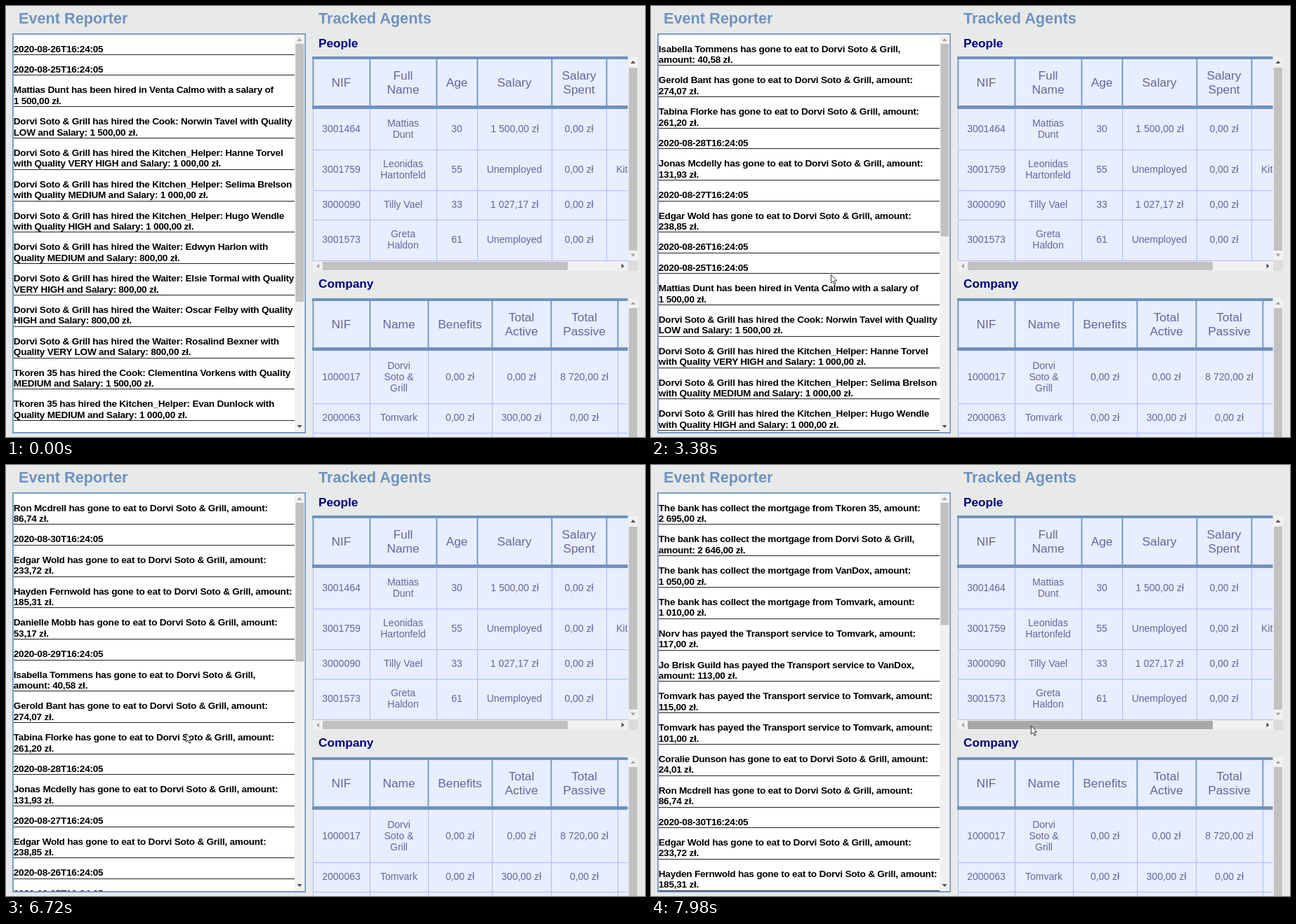
Write an HTML page that moves like this. It is 910x615 px and loops after 8000 ms.

```html
<!DOCTYPE html>
<html lang="en">
<head>
<meta charset="utf-8">
<title>Event Reporter</title>
<style>
  html, body { margin: 0; width: 100%; height: 100%; overflow: hidden; background: #e7eae9; }
  svg { display: block; font-family: "Liberation Sans", Arial, sans-serif; }
  .title { font-size: 21.7px; font-weight: bold; fill: #7092be; }
  .sub { font-size: 17.2px; font-weight: bold; fill: #000080; }
  .log { font-size: 13.6px; font-weight: bold; letter-spacing: -0.245px; fill: #000; }
  .head { font-size: 17.3px; fill: #666699; }
  .cell { font-size: 14px; fill: #666699; }
  .mid { text-anchor: middle; }
</style>
</head>
<body>
<svg id="stage" width="910" height="615" viewBox="0 0 910 615">
  <defs>
    <clipPath id="logClip"><rect x="10" y="41" width="401" height="567"/></clipPath>
    <clipPath id="tableClip"><rect x="436" y="70" width="449.5" height="545"/></clipPath>
  </defs>
  <rect width="910" height="615" fill="#e7eae9"/>
</svg>
<script>
const LOOP = 8000;
const BLUE = '#7092be', CELL = '#e8edff', LINE = '#aabcfe';
const TRACK = '#f1f1f1', THUMB = '#c1c1c1', HOVER = '#a8a8a8';
const DARK = '#505050', PALE = '#a3a3a3';
const stage = document.getElementById('stage');

function add(parent, tag, attrs, text) {
  const el = document.createElementNS('http://www.w3.org/2000/svg', tag);
  for (const k in attrs) el.setAttribute(k, attrs[k]);
  if (text) el.textContent = text;
  parent.appendChild(el);
  return el;
}
const box = (p, x, y, width, height, fill) => add(p, 'rect', { x, y, width, height, fill });
const label = (p, x, y, cls, text) => add(p, 'text', { x, y, class: cls }, text);

// Small triangle centred on x, y; turn is in degrees, 0 points up
function arrow(x, y, turn, fill) {
  add(stage, 'path', { d: 'M-3.5 2 L0 -2 L3.5 2Z', fill, transform: `translate(${x} ${y}) rotate(${turn})` });
}

// Centred lines around the baseline of a single line
function lines(p, x, y, pitch, cls, text) {
  const parts = text.split('|');
  parts.forEach((s, i) => label(p, x, y + (i - (parts.length - 1) / 2) * pitch, cls + ' mid', s));
}

function table(top, edges, heads, rows, heights) {
  const g = add(stage, 'g', { 'clip-path': 'url(#tableClip)' });
  const body = top + 75;
  const mid = i => (edges[i] + edges[i + 1]) / 2;
  const total = heights.reduce((a, b) => a + b, 0);
  box(g, 437, top, 449, 75 + total, CELL);
  for (const x of edges) {
    box(g, x - 0.5, top, 1.8, 75, BLUE);
    box(g, x, body, 1, total, LINE);
  }
  box(g, 436, top, 450, 4, BLUE);
  box(g, 436, top + 70, 450, 5, BLUE);
  heads.forEach((h, i) => lines(g, mid(i), top + 43, 20, 'head', h));
  let y = body;
  heights.forEach((h, r) => {
    const base = y + h / 2 + 4.3;
    (rows[r] || []).forEach((s, i) => lines(g, mid(i), base, 16, 'cell', s));
    y += h;
    box(g, 437, y, 449, 1, LINE);
  });
  return g;
}

// Headings
label(stage, 18, 24.5, 'title', 'Event Reporter');
label(stage, 445, 24.5, 'title', 'Tracked Agents');
label(stage, 445, 59, 'sub', 'People');
label(stage, 445, 402, 'sub', 'Company');

// People
const people = table(72, [437, 518, 613, 671, 777, 855],
  ['NIF', 'Full|Name', 'Age', 'Salary', 'Salary|Spent'],
  [
    ['3001464', 'Mattias|Dunt', '30', '', '0,00 zł'],
    ['3001759', 'Leonidas|Hartonfeld', '55', 'Unemployed', '0,00 zł'],
    ['3000090', 'Tilly Vael', '33', '1 027,17 zł', '0,00 zł'],
    ['3001573', 'Greta|Haldon', '61', 'Unemployed', '0,00 zł']
  ], [58, 58, 42, 58]);
label(people, 869, 238.3, 'cell', 'Kitchen_Helper');
const salary = label(people, 724.5, 180.3, 'cell mid', '');

box(stage, 886, 73, 14, 290, TRACK);
box(stage, 887, 88, 12, 261, THUMB);
arrow(893, 80, 0, DARK);
arrow(893, 355.5, 180, PALE);
box(stage, 437, 364, 449, 14, TRACK);
box(stage, 886, 363, 14, 15, '#dcdcdc');
const sideThumb = box(stage, 451, 365, 349, 12, THUMB);
arrow(444, 371, -90, PALE);
arrow(878.5, 371, 90, DARK);

// Company
table(417, [437, 518, 601, 692, 776, 871],
  ['NIF', 'Name', 'Benefits', 'Total|Active', 'Total|Passive'],
  [
    ['1000017', 'Dorvi|Soto &|Grill', '0,00 zł', '0,00 zł', '8 720,00 zł'],
    ['2000063', 'Tomvark', '0,00 zł', '300,00 zł', '0,00 zł']
  ], [75, 42, 42]);
box(stage, 886, 417, 14, 198, TRACK);
box(stage, 887, 431, 12, 184, THUMB);
arrow(893, 424, 0, PALE);

// Event log frame
box(stage, 9, 39, 418, 570.8, BLUE);
box(stage, 10.8, 40.8, 414.4, 567.2, '#fff');
box(stage, 411.3, 40.8, 13.9, 567.2, TRACK);
arrow(418, 48, 0, PALE);
arrow(418, 600, 180, DARK);
const logThumb = box(stage, 412.4, 54, 11.8, 0, THUMB);
const log = add(stage, 'g', { 'clip-path': 'url(#logClip)' });

// Event texts; a bar marks the line break
const GRILL = 'Dorvi Soto & Grill';
const day = n => `2020-08-${n}T16:24:05`;
const ate = (who, sum) => `${who} has gone to eat to ${GRILL}, amount:|${sum} zł.`;
const moved = (who, to, sum, gap = ' amount:|') => `${who} has payed the Transport service to ${to},${gap}${sum} zł.`;
const loan = (who, sum, gap = ' amount:|') => `The bank has collect the mortgage from ${who},${gap}${sum} zł.`;
const hired = (job, who, rest, by = GRILL) => `${by} has hired the ${job}: ${who} ${rest} zł.`;
const BEFORE = '|amount: ';

// [time of arrival, text], oldest first
const events = [
  [0, hired('Kitchen_Helper', 'Leopold Farrant', 'with|Quality LOW and Salary: 1 000,00', 'Tkoren 35')],
  [0, hired('Kitchen_Helper', 'Evan Dunlock', 'with|Quality MEDIUM and Salary: 1 000,00', 'Tkoren 35')],
  [0, hired('Cook', 'Clementina Vorkens', 'with Quality|MEDIUM and Salary: 1 500,00', 'Tkoren 35')],
  [0, hired('Waiter', 'Rosalind Bexner', 'with|Quality VERY LOW and Salary: 800,00')],
  [0, hired('Waiter', 'Oscar Felby', 'with Quality|HIGH and Salary: 800,00')],
  [0, hired('Waiter', 'Elsie Tormal', 'with Quality|VERY HIGH and Salary: 800,00')],
  [0, hired('Waiter', 'Edwyn Harlon', 'with|Quality MEDIUM and Salary: 800,00')],
  [0, hired('Kitchen_Helper', 'Hugo Wendle', '|with Quality HIGH and Salary: 1 000,00')],
  [0, hired('Kitchen_Helper', 'Selima Brelson', '|with Quality MEDIUM and Salary: 1 000,00')],
  [0, hired('Kitchen_Helper', 'Hanne Torvel', '|with Quality VERY HIGH and Salary: 1 000,00')],
  [0, hired('Cook', 'Norwin Tavel', 'with Quality|LOW and Salary: 1 500,00')],
  [0, 'Mattias Dunt has been hired in Venta Calmo with a salary of|1 500,00 zł.'],
  [0, day(25)],
  [0, day(26)],
  [815, ate('Edgar Wold', '238,85')],
  [894, day(27)],
  [2060, ate('Jonas Mcdelly', '131,93')],
  [2140, day(28)],
  [3210, ate('Tabina Florke', '261,20')],
  [3290, ate('Gerold Bant', '274,07')],
  [3360, `Isabella Tommens has gone to eat to ${GRILL},|amount: 40,58 zł.`],
  [3440, day(29)],
  [5470, ate('Danielle Mobb', '53,17')],
  [5550, ate('Hayden Fernwold', '185,31')],
  [5550, ate('Edgar Wold', '233,72')],
  [5700, day(30)],
  [6720, ate('Ron Mcdrell', '86,74')],
  [6800, ate('Coralie Dunson', '24,01')],
  [6800, moved('Tomvark', 'Tomvark', '101,00')],
  [6970, moved('Tomvark', 'Tomvark', '115,00')],
  [6970, moved('Jo Brisk Guild', 'VanDox', '113,00', BEFORE)],
  [7110, moved('Norv', 'Tomvark', '117,00')],
  [7260, loan('Tomvark', '1 010,00')],
  [7340, loan('VanDox', '1 050,00')],
  [7490, loan(GRILL, '2 646,00', BEFORE)],
  [7570, loan('Tkoren 35', '2 695,00')]
].map(([at, text]) => ({ at, rows: text.split('|') }));

const PITCH = 15.4, ONE = 29.4, VIEW = 567, BASE = 832;
const tall = e => ONE + (e.rows.length - 1) * PITCH;

let shown = -1;
function drawLog(count) {
  if (count === shown) return;
  shown = count;
  log.replaceChildren();
  let y = 40.6;
  for (let i = count - 1; i >= 0 && y < 608; i--) {
    const e = events[i];
    e.rows.forEach((s, r) => label(log, 10.8, y + 25 + r * PITCH, 'log', s.trim()));
    y += tall(e);
    box(log, 11, Math.round(y - 0.95), 400, 1, '#222');
  }
  const extra = events.slice(0, count).filter(e => e.at).reduce((sum, e) => sum + tall(e), 0);
  logThumb.setAttribute('height', 540 * VIEW / (BASE + extra));
}

// Mouse pointer
const pointer = add(stage, 'path', {
  d: 'M.4 .4 V12.2 L3.1 9.7 L5 14.2 L7 13.3 L5.1 9 H8.6Z',
  fill: '#fff', stroke: '#222', 'stroke-width': 0.9
});
const beam = add(stage, 'path', {
  d: 'M251 379.5 H253 Q254 379.5 254 380.5 V390.5 Q254 391.5 253 391.5 H251 M257 379.5 H255 Q254 379.5 254 380.5 M254 390.5 Q254 391.5 255 391.5 H257',
  fill: 'none', stroke: '#333', 'stroke-width': 0.9
});

// Stepped move from a to b
function glide(t, start, step, count, a, b, ease) {
  const p = ease(Math.min(count, Math.floor((t - start) / step)) / count);
  return a.map((v, i) => v + (b[i] - v) * p);
}
const easeOut = p => 1 - (1 - p) ** 2;
const linear = p => p;

function pointerAt(t) {
  if (t < 1210) return glide(t, 420, 79, 10, [754, 330], [254, 385], easeOut);
  if (t < 2910) return [252, 384];
  if (t < 7650) return [256, 383];
  return glide(t, 7568, 82, 5, [256, 383], [541, 372], linear);
}

function render(t) {
  drawLog(events.filter(e => e.at <= t).length);
  salary.textContent = t >= 4920 && t < 5090 ? '15 €' : '1 500,00 zł';
  const typing = t >= 1210 && t < 2830;
  const [x, y] = pointerAt(t);
  beam.setAttribute('visibility', typing ? 'visible' : 'hidden');
  pointer.setAttribute('visibility', t < 420 || typing ? 'hidden' : 'visible');
  pointer.setAttribute('transform', `translate(${x} ${y})`);
  const over = t >= 7650 && x > 451 && x < 800 && y > 365 && y < 377;
  sideThumb.setAttribute('fill', over ? HOVER : THUMB);
}

const began = performance.now();
function tick() {
  render((performance.now() - began) % LOOP);
  requestAnimationFrame(tick);
}
tick();
</script>
</body>
</html>
```
